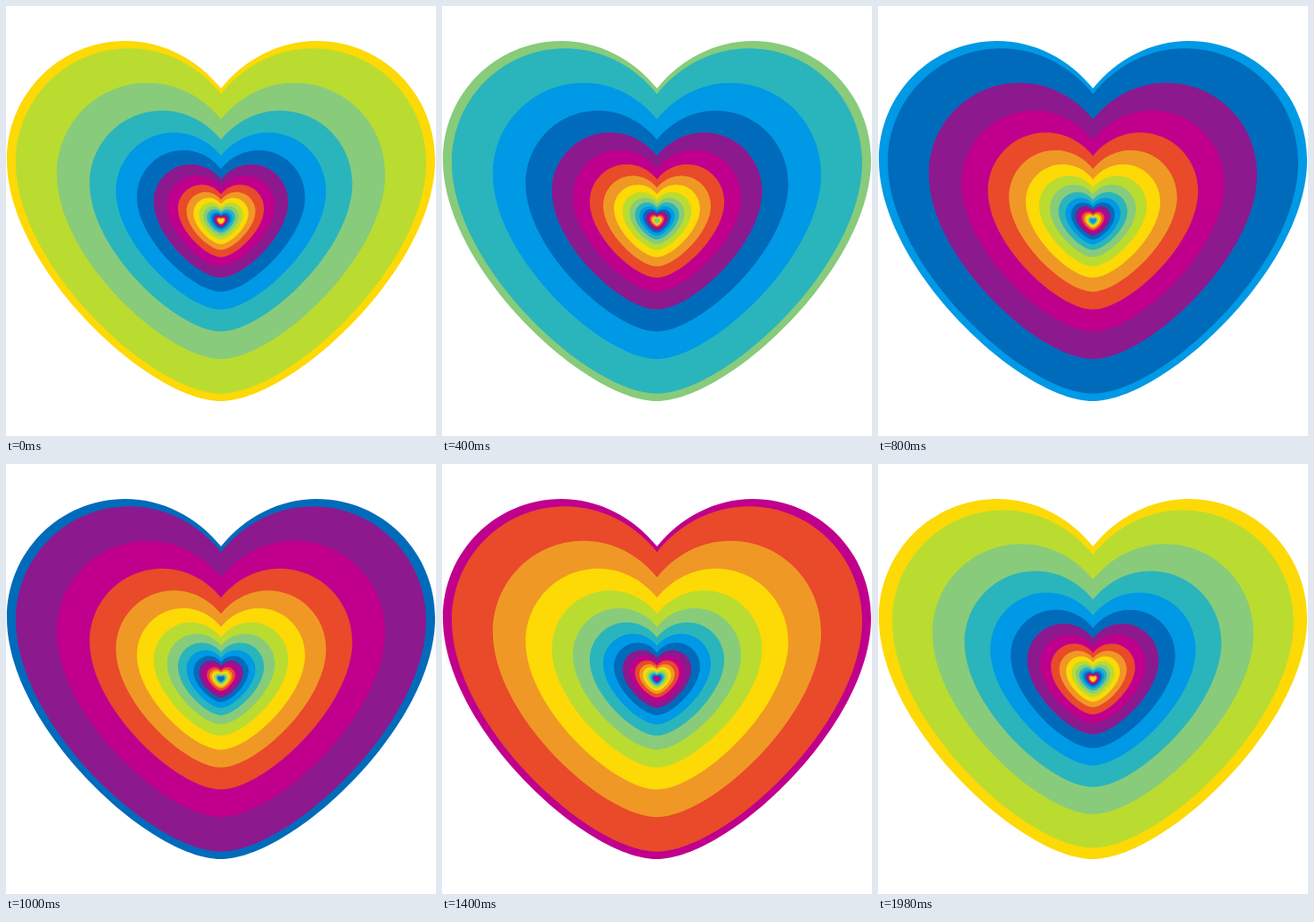
Recreate the animation shown at these times as an HTML page with a canvas. Size 480 by 480 pixels, loop 2 s.

```html
<!DOCTYPE html>
<html lang="en">
<head>
<meta charset="utf-8">
<title>Rainbow hearts</title>
<style>
html, body { margin: 0; width: 100%; height: 100%; overflow: hidden; background: #fff; }
canvas { display: block; width: 480px; height: 480px; }
</style>
</head>
<body>
<canvas width="480" height="480"></canvas>
<script>
const ctx = document.querySelector('canvas').getContext('2d');
const colors = ['#fdd906', '#badc30', '#88cb7b', '#2ab5bc', '#0099e5',
  '#006bbb', '#8d198f', '#c0008c', '#e84a2a', '#f09825'];

// Full-size heart, centred on the zoom point
const heart = new Path2D(
  'M0-148C-27-181-65-201-107-201C-180-201-239-142-239-68' +
  'C-239 52-80 201 0 201C80 201 239 52 239-68' +
  'C239-142 180-201 107-201C65-201 27-181 0-148Z');

const LOOP = 2000, STEP = 20, RING_TIME = 200;
const RATIO = 0.8, PHASE = 0.81, RINGS = 21;

function draw(now) {
  const time = Math.floor(now % LOOP / STEP) * STEP;
  const zoom = time / RING_TIME + PHASE;
  const first = Math.floor(zoom);
  ctx.clearRect(0, 0, 480, 480);
  for (let i = first; i < first + RINGS; i++) {
    // The outermost heart stops growing at full size
    const scale = Math.min(1, RATIO ** (i - zoom));
    ctx.setTransform(scale, 0, 0, scale, 240, 240);
    ctx.fillStyle = colors[i % colors.length];
    ctx.fill(heart);
  }
  ctx.resetTransform();
}

const start = performance.now();
function tick() {
  draw(performance.now() - start);
  requestAnimationFrame(tick);
}
tick();
</script>
</body>
</html>
```
